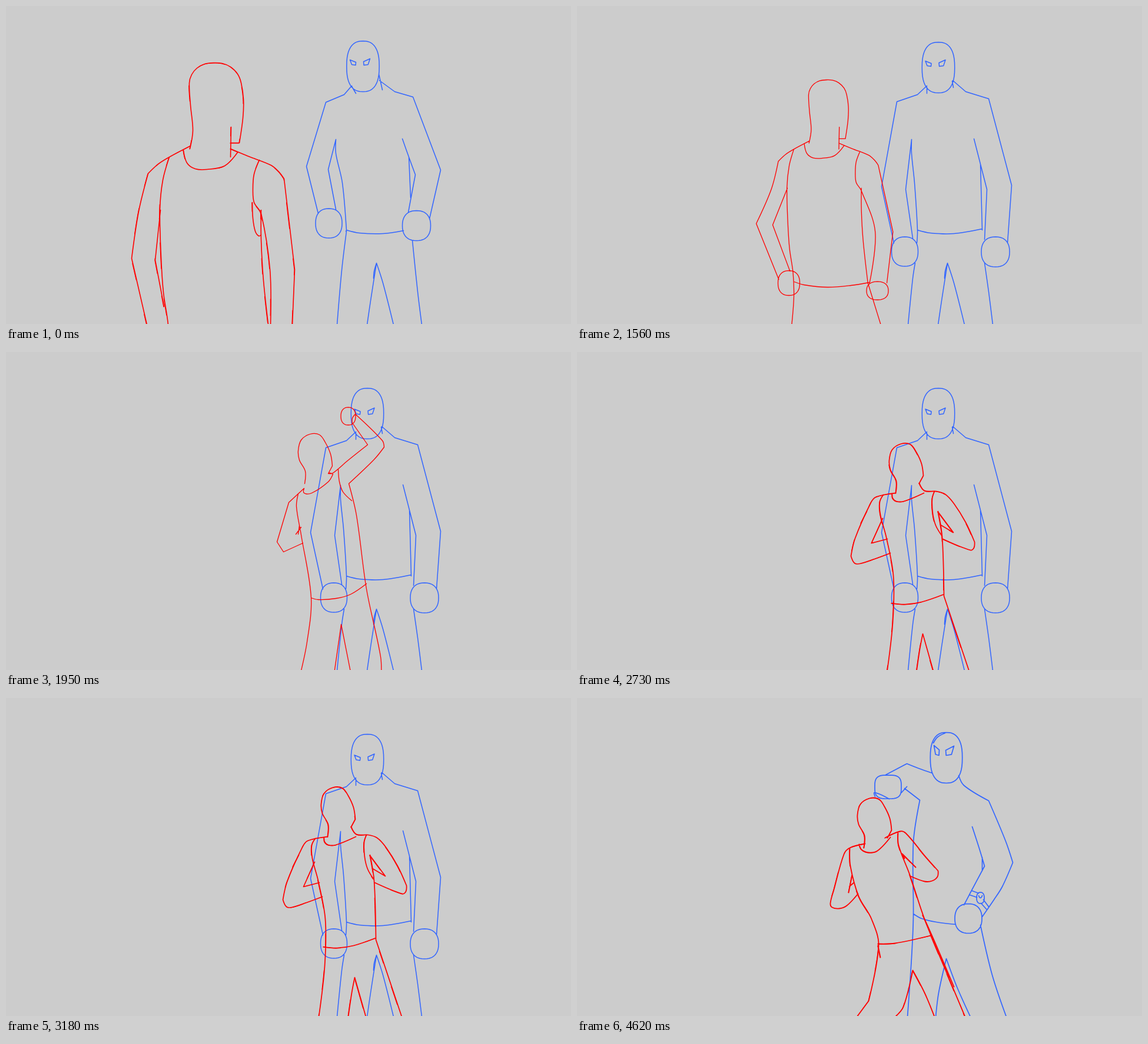
These frames come from a looping animation (960 px wide and 540 px high, 4920 ms). An HTML page:

```html
<!DOCTYPE html>
<html lang="en">
<head>
<meta charset="utf-8">
<title>Rough fight</title>
<style>
html, body { margin: 0; width: 100%; height: 100%; overflow: hidden; background: #ccc; }
svg { display: block; width: 100vw; height: 100vh; }
path { fill: none; stroke-linecap: round; stroke-linejoin: round; }
</style>
</head>
<body>
<svg id="stage" viewBox="0 0 960 540"></svg>
<script>
const RED = '#ff0000', BLUE = '#3366ff', LOOP = 4920;
const stage = document.getElementById('stage');

// Smooth stroke through key points; "^" marks a corner.
function stroke(text, map) {
  const pts = text.trim().split(/\s+/).map(t => {
    const [x, y] = map(...t.replace('^', '').split(',').map(Number));
    return { x, y, corner: t.endsWith('^') };
  });
  const dir = i => {
    const a = pts[i - 1], b = pts[i + 1];
    if (!a || !b || pts[i].corner) return [0, 0];
    const len = Math.hypot(b.x - a.x, b.y - a.y);
    return [(b.x - a.x) / len, (b.y - a.y) / len];
  };
  return pts.slice(1).reduce((d, q, i) => {
    const p = pts[i], u = dir(i), v = dir(i + 1), k = Math.hypot(q.x - p.x, q.y - p.y) / 3;
    return d + `C${p.x + u[0] * k} ${p.y + u[1] * k} ${q.x - v[0] * k} ${q.y - v[1] * k} ${q.x} ${q.y}`;
  }, `M${pts[0].x} ${pts[0].y}`);
}

// Several strokes, split by "/", placed at x, y and scaled.
const draw = (text, x = 0, y = 0, sx = 1, sy = sx) =>
  text.split('/').map(s => stroke(s, (a, b) => [x + a * sx, y + b * sy])).join('');

// Superellipse for heads and fists: a smaller power is squarer.
function oval(cx, cy, rx, ry, power = .85, tilt = 0) {
  const bulge = v => Math.sign(v) * Math.abs(v) ** power;
  const c = Math.cos(tilt), s = Math.sin(tilt);
  let d = '';
  for (let i = 0; i < 48; i++) {
    const a = i / 48 * 2 * Math.PI, x = rx * bulge(Math.cos(a)), y = ry * bulge(Math.sin(a));
    d += `${i ? 'L' : 'M'}${cx + x * c - y * s} ${cy + x * s + y * c}`;
  }
  return d + 'Z';
}

// x, y is the outer tip; a negative width mirrors the eye.
const eye = (x, y, w, h) => draw('0,0 1,.45^ .95,1^ .3,.9^ 0,0', x, y, w, h);

// Blue figure
const face = (x, y, look = 0) => oval(x, y, 27.7, 43, .8)
  + eye(x - 22, y - 11 + look, 10, 9) + eye(x + 12, y - 13 + look, -11, 11);

// k: 0 = arms bent, 1 = arms hanging
const stand = (k, neck = 587 + 7 * k) => draw(`
  ${neck},135 ${574 + 4 * k},150^ 543,${163 - k}^ ${510 + 7 * k},${272 + 34 * k}^ ${530 + 8 * k},${352 + 50 * k}
  / ${634 + 4 * k},126 660,145^ ${691 + 8 * k},${154 + 3 * k}^ 738,${278 + 26 * k}^ ${719 + 12 * k},${361 + 41 * k}
  / ${560 + 8 * k},226 ${547 + 11 * k},${277 + 34 * k}^ ${560 + 10 * k},${345 + 49 * k}
  / ${673 + k},225 ${684 + k},${256 + 12 * k} ${695 + k},${286 + 25 * k}^ ${683 + 9 * k},${350 + 46 * k}
  / ${684 + k},${256 + 12 * k} ${687 + k},${325 + 55 * k}
  / ${560 + 8 * k},226 ${560 + 8 * k},250 ${571 + 2 * k},300 578,380 577,${382 + 20 * k}
  / ${578 - 4 * k},${382 + 54 * k} 570,${448 + 14 * k} 562,541 / ${690 + 2 * k},${398 + 38 * k} 699,485 706,541
  / 578,380 600,385 640,386 ${675 + 13 * k},${381 - 3 * k}
  / 613,541 619,500 629,436^ 640,470 658,541 / 629,436 625,450 624,462`)
  + oval(548 + 8.5 * k, 368.5 + 48 * k, 22.5, 25) + oval(697 + 13.5 * k, 372.5 + 44.5 * k, 24, 25.5);

const neckTicks = x => draw(`${x - 19},136 ${x - 12},148 / ${x + 27},115 ${x + 33},142`);

const blueTense = face(606, 102) + neckTicks(606) + stand(0);
const blueCalm = face(613.5, 104) + stand(1) + draw('594,137 594,148 / 637,127 639,138');
const blueWary = face(613.5, 104, 3.5) + stand(1) + draw('594,137 594,148 / 637,127 639,138');
const blueHit = oval(603, 107, 28.5, 42, .82, -.13) + eye(584, 104, 8, 5) + eye(610, 96, -8, 10)
  + draw('592,85 598,112 611,137 / 587,112 598,115 612,106') + stand(1, 586);
const blueShow = oval(601.5, 102, 27.5, 43, .8) + eye(582, 86, 7, 10) + eye(616, 83, -13, 13) + draw(`
  601,80 597,101 / 627,108 634,137^ 679,151^ 753,207^ 753,241^ 700,255 643,270^ 634,240 638,227^ 673,226^ 664,215^ 674,212 698,222 723,214
  / 577,138 533,157^ 489,207^ 488,225^ 537,273^ 550,264 553,228^ 532,224^ 540,219 538,209^ 516,217 504,245
  / 539,214 549,211 555,245 562,375 549,470 541,541 / 698,223 690,214^ 674,210 680,222
  / 678,264 682,375 691,475 704,541 / 562,374 580,379 620,383 682,375 / 596,541 612,436^ 618,435^ 646,541`);
const blueSwing = oval(627, 101, 27.2, 43, .8) + eye(606, 80, 9, 17) + eye(640, 81, -14, 16)
  + oval(528, 150.5, 22.5, 20, .6) + oval(664.5, 374, 23, 25) + oval(685, 339, 6.5, 9.5) + draw(`
  605,76 612,66 625,59 / 603,127 580,119 560,111^ 524,130 / 506,167 505,160 530,171
  / 551,160 560,150 / 556,153 582,173^ 571,245 571,370 568,440 561,541 / 563,492 564,502
  / 648,131 657,148 699,174^ 728,243 740,279^ 722,320 708,342 688,371
  / 671,218 683,255 692,285^ 668,330 657,351 / 688,270 688,293
  / 671,327 682,331 / 667,334 679,338 / 690,342 699,354 / 686,348 695,358 / 682,335 685,339 688,335
  / 571,366 585,374 610,380 643,384 / 685,385 705,470 729,541 / 609,541 614,500 627,442^ 645,490 668,541`);

// Red figure seen from behind, in units of the closest view
const hood = (...place) => draw(`1,146 6,115 2,72 0,34 4,20 13,9 26,2 41,0 56,1 70,7 82,19 88,34 92,62 91,94 85,136^ 70,136
  / 71,109 70,160 / -10,148 -4,170 10,180 30,181 60,175 82,152`, ...place);

// e: how far the elbows stick out
const bust = (e, ...place) => hood(...place) + draw(`
  2,141 -34,160 -53,172 -70,188^ -86,252 ${-98 - 23 * e},332^ ${-72 + 3 * e},${445 + 16 * e}
  / 70,146 101,159 139,174 153,186 161,197^ ${179 + 16 * e},351^ ${175 + 6 * e},${445 + 24 * e}
  / -34,160 -45,199 -50,249 -48,330 -44,390 -36,445 -34,500 -39,566
  / -49,250 ${-58 - 25 * e},335^ -43,${414 + 28 * e}
  / 119,165 110,189 108,214 110,237 122,256 ${137 + 17 * e},351 ${138 + 3 * e},${445 + 24 * e}
  / 122,250 122,300 126,370 137,469^ 167,566`, ...place);

const redTense = bust(0, 311, 96) + draw('418,333 419,360 423,382 429,390 433,388');
const redCalm = bust(1, 393, 125, .735) + oval(359.5, 470, 18.5, 21) + oval(510, 483, 18.5, 15.5)
  + draw('369,468 385,473 425,477 465,474 496,469');
const redShow = hood(340, 107, .93, .9) + draw(`
  380,111 366,118 359,150 366,188 358,240 352,370 364,541
  / 345,234 314,246 250,273 207,288^ 170,275 138,256^ 134,242 127,215^ 119,224 125,237
  / 127,238 118,232 107,212^ 94,228 92,242 107,272 124,283 180,317 219,333^ 250,324 295,307
  / 314,246 295,310 289,380 295,490 298,541 / 294,315 289,365 289,405 / 296,488 297,525
  / 406,238 430,246 450,250 505,295 545,328^ 600,323 664,311^ 670,300 677,278^ 686,278^ 684,304^ 733,296^ 736,304 716,340 682,347 666,344^ 600,355 532,368^ 490,340 439,299
  / 449,250 440,247 432,255 425,300 431,352 439,364 449,367 / 453,310 453,335 447,430 449,541
  / 296,490 308,497 362,504 410,503 450,499`);

// Red figure turned towards the opponent
const profile = (x, y) => draw('11,84 12,63 2,44 0,28 5,10 20,0 36,1 46,14 55,34 58,54^ 51,67', x, y);

const redPunch = profile(541, 127) + oval(626, 96.5, 12.5, 15) + draw(`
  593,192 600,195^ 592,208 564,227 551,227 551,219^ 525,243^ 505,310^ 516,327^ 549,312 / 546,285 537,297 / 541,297 543,282
  / 593,194 600,193 625,172 659,145^ 633,108 / 609,187 611,208 617,225 632,240
  / 638,93 633,100 633,110 / 638,93 684,138 687,149^ 670,170 627,211^ 640,265 657,390 681,505 682,541
  / 541,228 538,250 546,298 563,405 556,480 543,541 / 563,405 575,408 605,406 630,399 657,381
  / 601,541 614,450^ 632,541`);
const redGuard = profile(535, 151.5) + draw(`
  545,235 512,242 503,253 477,312 470,342^ 476,354 485,355 510,347 537,337 / 487,286 497,266
  / 540,237 541,244 547,249 560,249 594,235 / 525,238 519,250 520,272 530,310 542,375 541,455 531,541
  / 524,278 505,320^ 532,313
  / 586,218 595,231 615,232 630,237 645,253 665,285 680,318^ 679,328 673,332 626,313
  / 612,232 608,245 609,270 614,290 624,307 / 618,266 625,310 628,410^ 672,541 / 618,267 644,302^ 622,289
  / 539,422 562,424 590,420 628,407 / 581,541 587,500 592,474^ 611,541`);
const redDuck = profile(476, 170) + draw(`
  489,247 463,254 453,265 436,325 430,348 433,355 445,357 458,352 477,332 / 479,248 483,257 495,262 510,259 532,236
  / 463,255 464,285 478,336 500,375 512,420 495,514^ 475,541 / 511,420 515,440 / 467,300 461,330 / 463,319 470,313
  / 523,237 548,226 558,229 590,267 613,293^ 612,303 603,310 590,311 566,302
  / 545,229 546,250 565,300 590,375 625,460 659,541 / 587,368 608,415 640,490 / 556,272 552,264^ 575,287
  / 511,417 540,416 600,403 / 540,541 554,524 570,462^ 590,500 607,541`);

// start, blue pose, blue width, red pose, red width, red offset
const poses = [
  [0, blueTense, 1.5, redTense, 1.6],
  [660, blueShow, 1.2, redShow, 1.4],
  [1560, blueCalm, 1.5, redCalm, 1.3],
  [1830, blueWary, 1.5, redCalm, 1.3, [65, 4]],
  [1950, blueWary, 1.5, redPunch, 1.3, [-45, 12]],
  [2070, blueWary, 1.5, redPunch, 1.3, [7, 9]],
  [2220, blueHit, 1.5, redPunch, 1.3],
  [2550, blueHit, 1.5, redGuard, 1.7, [-5, 4]],
  [2730, blueWary, 1.5, redGuard, 1.7, [-5, 4]],
  [3180, blueWary, 1.5, redGuard, 1.7],
  [4500, blueSwing, 1.7, redGuard, 1.7],
  [4620, blueSwing, 1.7, redDuck, 1.8]
];

function add(parent, tag, attrs) {
  const el = document.createElementNS('http://www.w3.org/2000/svg', tag);
  for (const k in attrs) el.setAttribute(k, attrs[k]);
  return parent.appendChild(el);
}

let seed = 7;
const random = () => (seed = seed * 16807 % 2147483647) / 2147483647;

// A broken second pass gives the heavier red drawings their pencil look.
const retrace = () => Array.from({ length: 10 }, (_, i) => (i % 2 ? 30 : 15) + 40 * random()).join(' ');

function figure(parent, d, color, width, [x, y] = [0, 0]) {
  const g = add(parent, 'g', { stroke: color, 'stroke-width': width, transform: `translate(${x + .5} ${y + .5})` });
  add(g, 'path', { d });
  if (color === RED && width > 1.5)
    add(g, 'path', { d, transform: 'translate(-.7 .5)', 'stroke-width': 1, 'stroke-dasharray': retrace() });
}

const layers = poses.map(([, blue, blueWidth, red, redWidth, shift]) => {
  const g = add(stage, 'g', { display: 'none' });
  figure(g, blue, BLUE, blueWidth);
  figure(g, red, RED, redWidth, shift);
  return g;
});

let shown = -1;
function render(time) {
  const t = time % LOOP;
  const i = poses.findLastIndex(p => p[0] <= t);
  if (i === shown) return;
  layers.forEach((g, k) => g.setAttribute('display', k === i ? 'inline' : 'none'));
  shown = i;
}

const start = performance.now();
function tick() {
  render(performance.now() - start);
  requestAnimationFrame(tick);
}
tick();
</script>
</body>
</html>
```
